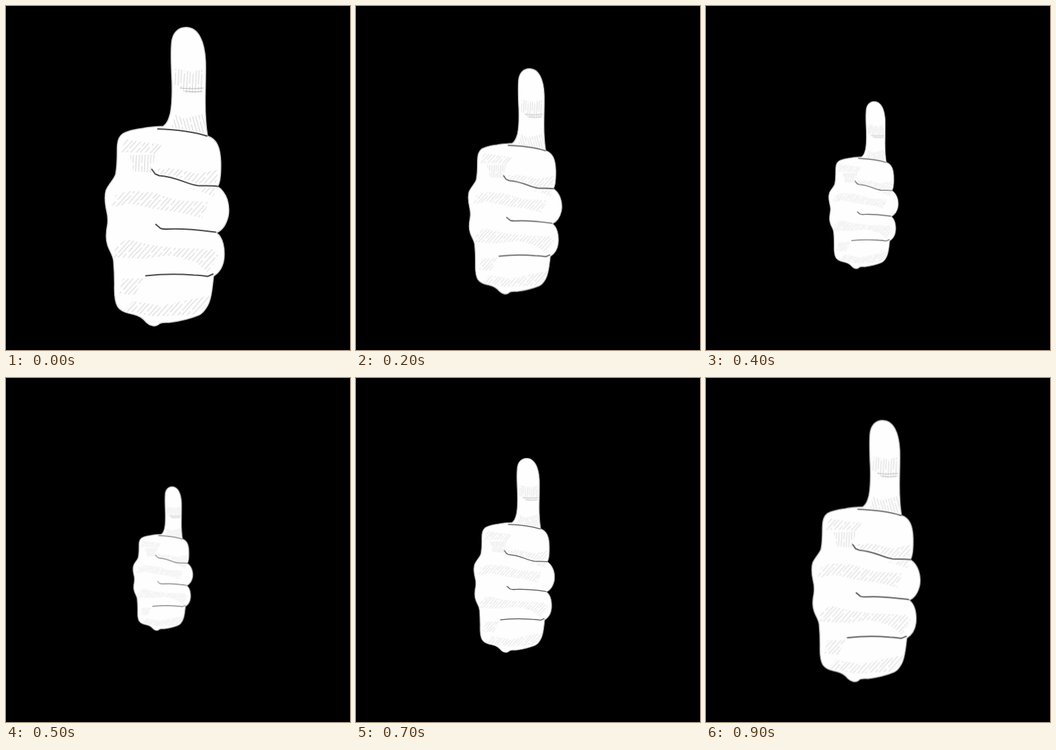
An HTML page without scripts for the animation above (1 s loop, 512x512 px).

```html
<!DOCTYPE html>
<html lang="en">
<head>
<meta charset="utf-8">
<title>Thumbs up</title>
<style>
html, body { margin: 0; width: 100%; height: 100%; overflow: hidden; background: #000; }
svg { display: block; width: 100%; height: 100%; }
.hand { transform-origin: 228px 282.5px; animation: pulse 1s step-end infinite; }
.skin { fill: #fefefe; stroke: #d0d0d0; stroke-width: 1.5; stroke-linejoin: round; }
.crease { fill: none; stroke: #4a4a4a; stroke-width: 2; stroke-linecap: round; stroke-linejoin: round; }
.fold { fill: none; stroke: #b8b8b8; stroke-width: 1.1; }
.hatch { fill: none; stroke: #d6d6d6; stroke-width: 1.1; }
@keyframes pulse {
  0% { transform: scale(1); }
  10%, 90% { transform: scale(.875); }
  20%, 80% { transform: scale(.755); }
  30%, 70% { transform: scale(.65); }
  40%, 60% { transform: scale(.56); }
  50% { transform: scale(.482); }
  100% { transform: scale(1); }
}
</style>
</head>
<body>
<svg viewBox="0 0 512 512">
  <defs>
    <!-- Uneven spacing and breaks give a pencil look -->
    <pattern id="slant" width="16" height="47" patternUnits="userSpaceOnUse" patternTransform="rotate(42)">
      <path class="hatch" d="M2 0V20M2 23V47M6.500 0V34M7 38V47M12.500 0V9M12 13V47"/>
    </pattern>
    <pattern id="upright" width="13" height="61" patternUnits="userSpaceOnUse" patternTransform="rotate(3)">
      <path class="hatch" d="M2 0V61M6 0V40M6.500 44V61M10 0V22M10.500 25V61"/>
    </pattern>
    <pattern id="lean" width="14" height="53" patternUnits="userSpaceOnUse" patternTransform="rotate(-16)">
      <path class="hatch" d="M2 0V53M7 0V30M6.500 33V53M11.500 0V53"/>
    </pattern>
  </defs>
  <g class="hand">
    <path class="skin" d="M268 31.800C256 31.800 248 40 246.500 54C245 70 246 92 247 112C247.500 130 247 148 244.500 160C242 169 240 175 234 179C222 179.500 213 180 204 182C192 183.500 181 186 174 190C167 195 165.500 203 165.500 214C165.500 228 165 242 163 251C160 259 153 265 149 274C145.500 285 148 297 150 306C152 314 152 319 151 326C149 336 148 346 151 355C153 363 159 370 160 379C161 390 161.500 402 161.500 414C161 428 162 440 166 447C171 455 181 457 190 459C199 461 205 466 209 471C214 476 222 478 227 474C230 470 236 471 243 471C259 469 275 465 287 460C294 457 297 451 300 446C306 435 307 418 309 402C317 397 323 389 324.500 376C326 361 323 344 313 337.500C322 334 328 325 331 312C333.500 296 329 278 315 268.500C319.500 262 320 247 319.700 232C319 211 314 198 300 193.500C297.500 178 296.500 161 296.500 143C296.500 123 297.500 102 297 82C295.500 52 286 31.800 268 31.800Z"/>
    <g fill="url(#slant)">
      <path d="M170 218L178 198L206 203L232 206L227 221L206 218Z"/>
      <path d="M224 242L250 241L285 250L317 243L312 265L282 264L258 255L228 250Z"/>
      <path d="M157 300L163 282L180 275L216 277L255 289L302 292L292 316L262 308L220 302L184 294Z"/>
      <path d="M274 272L314 271L309 283L292 277Z"/>
      <path d="M159 374L164 356L180 347L212 355L250 360L307 362L317 372L300 396L282 381L245 371L205 376Z"/>
      <path d="M168 428L174 406L205 405L192 430Z"/>
      <path d="M176 454L189 439L230 446L303 431L298 446L282 459L220 462Z"/>
    </g>
    <g fill="url(#upright)">
      <path d="M184 222L222 221L216 248L190 246Z"/>
      <path d="M252 93L276 98L294 94L294 128L266 130L258 119L251 117Z"/>
    </g>
    <path d="M246 182L252 161L265 168L294 160L298 190L268 184Z" fill="url(#lean)"/>
    <path class="fold" d="M259 122Q275 124 294 122M266 126.500Q279 129 292 127"/>
    <path class="crease" d="M226 183C252 184 279 187 299 193.500M217 243L222 250L228 252.500C255 254.500 268 265 285 267.300C295 268 306 267 315 268.500M223 325L230 331Q235 332.500 241 332C266 330.500 292 334 312 336.500M208 401.500C235 398.500 262 399 280 400.500Q292 401 300 402.500L308 399"/>
  </g>
</svg>
</body>
</html>
```
